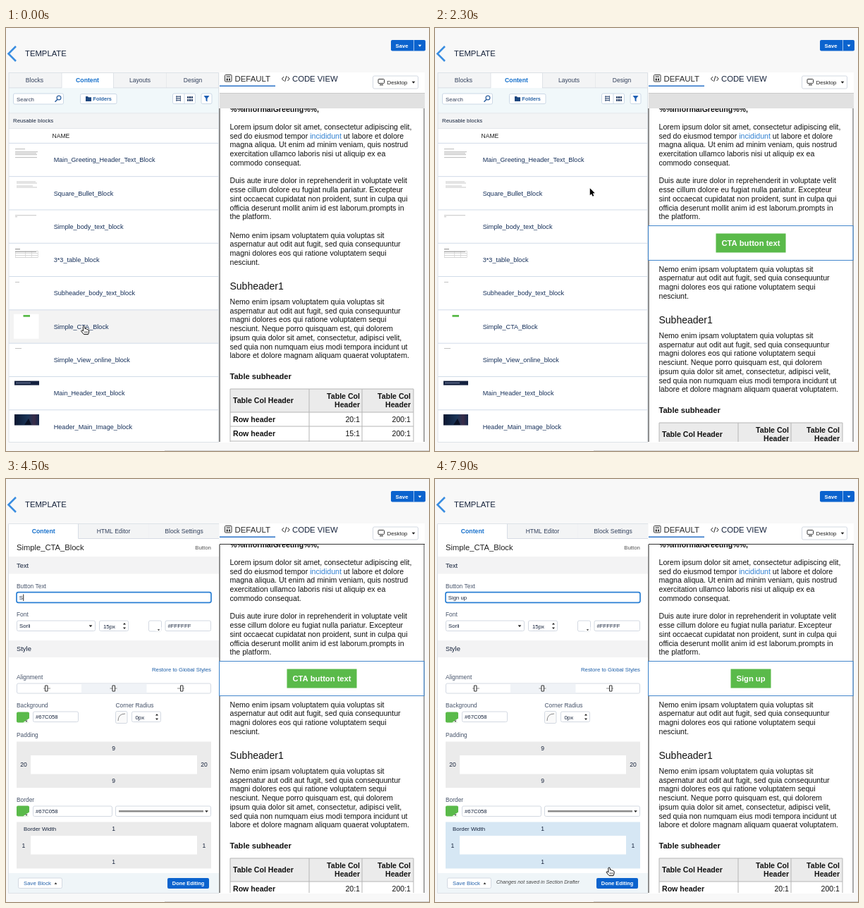
Write an HTML page with a canvas that moves like this. It is 600 px wide and 600 px high and loops after 8 s.

```html
<!DOCTYPE html>
<html lang="en">
<head>
<meta charset="utf-8">
<title>Template editor</title>
<style>
html, body { margin: 0; width: 100%; height: 100%; overflow: hidden; background: #f8f8f8; }
canvas { display: block; width: 100vw; height: 100vh; }
</style>
</head>
<body>
<canvas id="stage"></canvas>
<script>
const LOOP = 8000, STEP = 100, SIZE = 600;
const NAVY = '#16305a', BLUE = '#0b63ce', GREEN = '#5aba4a', EDGE = '#d3d9e2';
const canvas = document.getElementById('stage');
const c = canvas.getContext('2d');

// ---- drawing helpers ----
function text(s, x, mid, size, color = '#16233c', style = '', align = 'left') {
  c.font = `${style} ${size}px "Liberation Sans", sans-serif`;
  c.textAlign = align;
  c.fillStyle = color;
  c.fillText(s, x, mid + size * 0.36);
}
function rect(x, y, w, h, color) {
  c.fillStyle = color;
  c.fillRect(x, y, w, h);
}
function box(x, y, w, h, fill, edge, r = 2, lw = 1) {
  c.beginPath();
  c.roundRect(x, y, w, h, r);
  if (fill) { c.fillStyle = fill; c.fill(); }
  if (edge) { c.strokeStyle = edge; c.lineWidth = lw; c.stroke(); }
}
function line(points, color, lw = 1) {
  c.beginPath();
  for (let i = 0; i < points.length; i += 2) c.lineTo(points[i], points[i + 1]);
  c.strokeStyle = color;
  c.lineWidth = lw;
  c.stroke();
}
function poly(points, color) {
  c.beginPath();
  for (let i = 0; i < points.length; i += 2) c.lineTo(points[i], points[i + 1]);
  c.closePath();
  c.fillStyle = color;
  c.fill();
}
function down(x, y, color = '#222', r = 2.3) { poly([x - r, y - r / 2, x + r, y - r / 2, x, y + r / 2 + 0.5], color); }
function up(x, y, color = '#222', r = 2) { poly([x - r, y + r / 2, x + r, y + r / 2, x, y - r / 2 - 0.5], color); }
function clipped(x, y, w, h, draw) {
  c.save();
  c.beginPath();
  c.rect(x, y, w, h);
  c.clip();
  draw();
  c.restore();
}

// ---- timing helpers ----
function along(keys, t) {
  let i = 0;
  while (i < keys.length - 2 && t >= keys[i + 1][0]) i++;
  const [t0, x0, y0] = keys[i], [t1, x1, y1] = keys[i + 1];
  const k = Math.min(1, Math.max(0, (t - t0) / (t1 - t0)));
  return [x0 + (x1 - x0) * k, y0 + (y1 - y0) * k];
}
const TYPED = [[0, 'CTA button text'], [4500, 'S'], [5000, 'Si'], [5300, 'Sig'], [5600, 'Sign'],
  [6000, 'Sign '], [6500, 'Sign u'], [6900, 'Sign up']];
const typed = t => TYPED.filter(k => k[0] <= t).pop()[1];

const MOVES = [
  { from: 0, to: 1900, kind: 'hand', keys: [[100, 110.5, 423], [300, 128, 414], [500, 195, 372],
    [800, 310, 294], [1000, 338, 261], [1100, 338, 264], [1300, 334, 276]] },
  { from: 1900, to: 3200, kind: 'arrow', keys: [[1900, 334, 274], [2100, 295, 259], [2200, 253.5, 248.5],
    [2400, 186, 206], [2600, 127.5, 177.5], [3000, 82, 168], [3200, 66, 168]] },
  { from: 3200, to: 4500, kind: 'beam', keys: [[3200, 73, 168], [3500, 73, 168], [3900, 17, 168]] },
  { from: 7500, to: 8000, kind: 'auto', keys: [[7500, 214, 217], [7600, 222, 300], [7700, 232, 402],
    [7800, 242, 505], [7900, 247, 551]] }
];

// ---- page header and preview ----
function chrome() {
  rect(0, 0, SIZE, SIZE, '#f8f8f8');
  rect(225, 599, 375, 1, '#cfcfcf');
  line([14, 26, 3.5, 36.5, 14, 47], '#3a8de0', 2.6);
  text('TEMPLATE', 27, 35.5, 11.3, '#16233c');
  box(546, 17, 49, 15.5, BLUE, null, 2);
  rect(578, 17, 1, 15.5, '#9cc3f0');
  text('Save', 552.5, 25, 7.7, '#fff', 'bold');
  down(587, 25, '#fff');
  rect(303, 63, 291, 525, '#fff');
  box(310.5, 66.5, 9.5, 9.5, null, '#333', 1);
  rect(312.5, 68.5, 5.5, 1.2, '#333');
  rect(312.5, 71.5, 2.4, 3, '#333');
  rect(316, 71.5, 2, 3, '#333');
  text('DEFAULT', 324.5, 72, 11.4, '#2b2b2b');
  rect(303, 81.5, 79, 1.5, '#2a72c8');
  line([394, 69, 391.5, 72, 394, 75], '#222');
  line([398, 68, 395.5, 76], '#222');
  line([399.5, 69, 402, 72, 399.5, 75], '#222');
  text('CODE VIEW', 406, 72, 11.3, '#16233c');
  box(520.5, 68, 64, 18, '#fff', EDGE);
  box(528, 72.5, 8.5, 6, null, '#333', 1);
  rect(530, 80, 5, 1.2, '#333');
  text('Desktop', 540.5, 77, 7.9, '#222');
  down(578, 77);
}

const INTRO = ['Lorem ipsum dolor sit amet, consectetur adipiscing elit,', '',
  'magna aliqua. Ut enim ad minim veniam, quis nostrud',
  'exercitation ullamco laboris nisi ut aliquip ex ea', 'commodo consequat.', '',
  'Duis aute irure dolor in reprehenderit in voluptate velit',
  'esse cillum dolore eu fugiat nulla pariatur. Excepteur',
  'sint occaecat cupidatat non proident, sunt in culpa qui',
  'officia deserunt mollit anim id est laborum.prompts in', 'the platform.'];
const NEMO = ['Nemo enim ipsam voluptatem quia voluptas sit',
  'aspernatur aut odit aut fugit, sed quia consequuntur',
  'magni dolores eos qui ratione voluptatem sequi'];
const MORE = [...NEMO, 'nesciunt. Neque porro quisquam est, qui dolorem',
  'ipsum quia dolor sit amet, consectetur, adipisci velit,',
  'sed quia non numquam eius modi tempora incidunt ut',
  'labore et dolore magnam aliquam quaerat voluptatem.'];
const BODY = 10.6, LEAD = 12.75;

function lines(list, y) {
  list.forEach((s, i) => text(s, 317.5, y + i * LEAD, BODY, '#111'));
}
function linkLine(y) {
  let x = 317.5;
  for (const [s, color] of [['sed do eiusmod tempor ', '#111'], ['incididunt', '#2f7fd0'], [' ut labore et dolore', '#111']]) {
    text(s, x, y, BODY, color);
    x += c.measureText(s).width;
  }
}
function table(y) {
  rect(318, y, 260, 33, '#ebebeb');
  for (const d of [0, 33, 53, 74]) rect(318, y + d - 0.5, 260, 1, '#b5b5b5');
  for (const x of [317.5, 429.5, 504.5, 577.5]) rect(x, y, 1, 80, '#b5b5b5');
  text('Table Col Header', 322, y + 16.5, BODY, '#111', 'bold');
  for (const x of [502, 574]) {
    text('Table Col', x, y + 10, BODY, '#111', 'bold', 'right');
    text('Header', x, y + 22.5, BODY, '#111', 'bold', 'right');
  }
  ['20:1', '15:1'].forEach((v, i) => {
    const mid = y + 43 + i * 20.5;
    text('Row header', 322, mid, BODY, '#111', 'bold');
    text(v, 502, mid, BODY, '#111', '', 'right');
    text('200:1', 574, mid, BODY, '#111', '', 'right');
  });
}
function preview(t) {
  const dropped = t >= 1900, edited = t >= 2400;
  const top = edited ? 93 : 114, dy = edited ? -22 : 0, gap = dropped ? 48 : 0;
  clipped(302, top, 293, 587 - top, () => {
    rect(302.5, top, 1, 500, '#222');
    rect(592.5, top, 1, 500, '#555');
    c.save();
    c.translate(0, dy);
    text('%%InformalGreeting%%,', 318, 115, BODY, '#111', 'bold');
    lines(INTRO, 140);
    linkLine(140 + LEAD);
    c.translate(0, gap);
    lines([...NEMO, 'nesciunt.'], 293.7);
    text('Subheader1', 317.5, 366, 14, '#111');
    lines(MORE, 388);
    text('Table subheader', 317.5, 494, 11.1, '#111', 'bold');
    table(512);
    c.restore();
  });
  if (edited) rect(303, 92, 291, 1, '#333');
  else {
    rect(303, 92, 291, 22, '#e1e1e1');
    rect(303, 92, 291, 1, '#cacaca');
  }
  if (t >= 800 && !dropped) {
    box(303, 278, 290, 10, '#fff', null, 3);
    rect(303, 281, 290, 4.5, '#8fb3e2');
    rect(303, 281, 290, 1, '#7d9cc8');
  }
  if (dropped) {
    box(302.5, 280.5 + dy, 290.5, 49, '#fff', '#4487cc', 0, 1.2);
    const label = typed(t - STEP).trim();
    c.font = 'bold 11.2px "Liberation Sans", sans-serif';
    const w = c.measureText(label).width + 16;
    rect(448 - w / 2, 291.5 + dy, w, 27, GREEN);
    text(label, 448, 305 + dy, 11.2, '#fff', 'bold', 'center');
  }
  if (t >= 2000 && t < 2300) hoverCover();
}
function hoverCover() {
  rect(303, 93, 290, 187, 'rgba(0,0,0,.57)');
  c.beginPath();
  c.arc(580.5, 106, 8.5, 0, 7);
  c.strokeStyle = '#eee';
  c.lineWidth = 1.3;
  c.stroke();
  line([576, 104.5, 580.5, 109, 585, 104.5], '#eee', 1.5);
  line([398.5, 188.5, 405, 182], '#fff', 2.6);
  poly([396.5, 190.5, 397.5, 187, 400, 189.5], '#fff');
  text('Text ', 410, 186, 11.2, '#fff');
  text('(Click to edit)', 410 + c.measureText('Text ').width, 186, 11.2, '#fff', 'italic');
}

// ---- block list ----
const NAMES = ['Main_Greeting_Header_Text_Block', 'Square_Bullet_Block', 'Simple_body_text_block',
  '3*3_table_block', 'Subheader_body_text_block', 'Simple_CTA_Block', 'Simple_View_online_block',
  'Main_Header_text_block', 'Header_Main_Image_block'];
const ROW = 47.3;

function thumbs(hovered) {
  const y = i => 163.3 + i * ROW;
  const bars = (x, top, widths, color) => widths.forEach((w, i) => rect(x, top + i * 2, w, 0.8, color));
  bars(13, y(0) + 8, [14, 0, 32, 30, 31, 0, 31], '#aaa');
  bars(15, y(1) + 7, [27, 29, 0, 23, 29], '#bbb');
  bars(13, y(2) + 7.5, [30, 3], '#b5b5b5');
  rect(13, y(3) + 8, 7, 1, '#888');
  for (let i = 0; i < 4; i++) rect(13, y(3) + 11 + i * 3, 32, 0.6, '#bbb');
  for (const x of [13, 27, 36, 45]) rect(x, y(3) + 11, 0.6, 9.5, '#ccc');
  bars(13, y(3) + 12, [30], '#999');
  rect(13, y(4) + 7.5, 6, 0.9, '#bbb');
  if (hovered) rect(11, y(5) + 6, 35.5, 35, '#fff');
  rect(24.5, y(5) + 7.2, 9.5, 2.8, GREEN);
  rect(13, y(6) + 7, 9, 0.9, '#bbb');
  rect(12, y(7) + 6.2, 35, 6, '#14213f');
  rect(14, y(7) + 8.6, 21, 1, '#7d8bab');
  const g = c.createLinearGradient(12, 0, 47, 0);
  g.addColorStop(0, '#0b1730');
  g.addColorStop(0.55, '#1b3558');
  g.addColorStop(0.8, '#3a2c48');
  g.addColorStop(1, '#14274a');
  rect(12, y(8) + 6.3, 35, 15.5, g);
  poly([26, 563, 32, 554, 36, 563], '#0a1124');
}
function blockList(t) {
  rect(4, 63, 298, 525, '#fff');
  rect(4, 63, 298, 22, '#f3f4f5');
  rect(79, 63, 73.5, 23, '#fff');
  line([79, 85, 79, 63.5, 152.5, 63.5, 152.5, 85], '#e0e3e7');
  rect(227, 63, 1, 22, '#e8eaed');
  text('Blocks', 40.5, 74, 8.6, '#33415c', '', 'center');
  text('Content', 115.5, 74, 8.7, '#1670cc', 'bold', 'center');
  text('Layouts', 190, 74, 8.6, '#33415c', '', 'center');
  text('Design', 265, 74, 8.5, '#33415c', '', 'center');
  rect(4, 85, 298, 36, '#f1f8fa');
  rect(4, 84.5, 75, 0.8, EDGE);
  rect(152, 84.5, 150, 0.8, EDGE);
  box(10.5, 93, 71, 15, '#fff', '#cbd8e6');
  text('Search', 15, 101, 7.9, '#33415c');
  c.beginPath();
  c.arc(75, 99, 2.9, 0, 7);
  c.strokeStyle = '#2b5f9e';
  c.lineWidth = 1.2;
  c.stroke();
  line([73, 101.2, 69.5, 104.8], '#2b5f9e', 1.6);
  box(105.5, 93.5, 51.5, 14, '#fff', '#cbd8e6');
  poly([113, 97, 116, 97, 117, 98.2, 121, 98.2, 121, 104, 113, 104], '#1c477f');
  text('Folders', 123.5, 100.7, 7.3, '#2b66a8', 'bold');
  box(236.5, 93, 32, 14.5, '#fff', '#cbd8e6');
  rect(252.5, 93, 1, 14, '#cbd8e6');
  for (let i = 0; i < 3; i++) {
    rect(241, 96.5 + i * 2.7, 7, 1.4, '#53698a');
    rect(257.2 + i * 2.8, 97, 2, 2.8, NAVY);
    rect(257.2 + i * 2.8, 101, 2, 2.8, NAVY);
  }
  line([242, 96, 242, 104], '#53698a');
  line([247.5, 96, 247.5, 104], '#53698a');
  box(277, 93, 15, 14.5, '#fff', '#cbd8e6');
  poly([280.5, 96, 288.5, 96, 285.5, 100, 285.5, 104.5, 283.5, 103, 283.5, 100], '#1d5fb4');
  rect(4, 121, 298, 21.5, '#f3f4f5');
  rect(4, 120.5, 298, 0.8, '#e0e4e9');
  rect(4, 142, 298, 0.8, '#e0e4e9');
  text('Reusable blocks', 10, 131.5, 7.8, '#16233c');
  text('NAME', 65.5, 153, 8.6, '#222');
  const hovered = t < 1900;
  NAMES.forEach((name, i) => {
    const y = 163.3 + i * ROW;
    if (i === 5 && hovered) rect(4, y, 298, ROW, '#f3f3f3');
    rect(4, y - 0.4, 298, 0.9, '#ccd8e6');
    text(name, 67.7, y + 23.7, 9.12, NAVY);
  });
  if (t < 200 || t >= 1900) thumbs(hovered);
  line([4, 63.5, 301.5, 63.5, 301.5, 587.5, 4, 587.5, 4, 63], '#dbe0e6', 0.9);
}

// ---- block editor ----
function stepper(x, y) { up(x, y - 3); down(x, y + 3, '#222', 2); }
function swatch(x, y, color) {
  box(x, y, 18, 15, color, color === '#fff' ? EDGE : null, 2);
  poly([x + 18, y + 9, x + 18, y + 15, x + 9, y + 15], '#fff');
  down(x + 14, y + 13, '#333', 1.7);
}
function field(x, y, w, label, h = 14.5) {
  box(x + 0.5, y, w - 1, h, '#fff', EDGE);
  if (label) text(label, x + 4, y + h / 2 + 0.2, 7.8, '#16233c');
}
function insets(y, h, side, hover, middle) {
  rect(15, y, 276, h, hover ? '#d6e7f4' : '#ebebeb');
  rect(35, y + 19.5, 236, 26.5, '#fff');
  const num = (s, x, mid) => text(s, x, mid, 8.6, '#16233c', '', 'center');
  num(middle, 152.7, y + 9.2);
  num(middle, 152.7, y + h - 9.7);
  num(side, 25, y + h / 2);
  num(side, 281, y + h / 2);
}
function editor(t, tip) {
  const label = (s, x, y) => text(s, x, y, 8.4, '#46536a');
  const over = (y0, y1) => t >= 7500 && tip && tip[1] >= y0 && tip[1] < y1;
  rect(3, 63, 299, 525, '#fff');
  rect(103, 63, 199, 21.5, '#f3f4f5');
  line([302, 84.5, 102.5, 84.5, 102.5, 63.5], EDGE, 0.9);
  rect(202, 63, 1, 21, '#f0f1f3');
  text('Content', 53.2, 74, 8.7, '#1670cc', 'bold', 'center');
  text('HTML Editor', 152.5, 74, 8.5, '#33415c', '', 'center');
  text('Block Settings', 252.5, 74, 8.6, '#33415c', '', 'center');
  text('Simple_CTA_Block', 15, 97.3, 11.2, '#222');
  text('Button', 291, 97.5, 7.9, '#555', '', 'right');
  rect(3, 110, 299, 24.5, '#f3f3f4');
  text('Text', 15, 122.3, 9.4, '#16233c');
  label('Button Text', 15, 152);
  label('Font', 15, 191.8);
  field(15, 201, 112, 'Sorli');
  down(120, 208.5);
  field(132, 201, 42);
  text('15px', 138, 209, 7.8);
  stepper(168, 208.5);
  swatch(202.5, 201, '#fff');
  field(225.5, 201, 65.5, '#FFFFFF');
  rect(3, 229, 299, 24, '#f3f3f4');
  text('Style', 15, 241, 9.4, '#16233c');
  text('Restore to Global Styles', 291, 269.7, 7.8, '#1c5ea8', '', 'right');
  label('Alignment', 15, 281);
  box(15.5, 290, 275, 14, '#fff', EDGE);
  rect(107, 290.5, 92.5, 13, '#f0f3f7');
  [[58, 2], [152.5, 0], [248, -2]].forEach(([x, d]) => {
    line([x - 5, 297, x + 5, 297], '#777', 0.9);
    box(x - d / 2 - 1.5, 293, 3.5, 8, '#fff', '#333', 0);
  });
  label('Background', 15, 321);
  label('Corner Radius', 155.5, 321);
  swatch(15, 330.5, GREEN);
  field(38, 330, 65, '#67C058');
  box(155.5, 329.5, 16.5, 17, '#fafafa', EDGE);
  c.beginPath();
  c.moveTo(159, 343);
  c.quadraticCurveTo(159, 333, 169, 333);
  c.strokeStyle = '#888';
  c.lineWidth = 1;
  c.stroke();
  field(178, 330, 42);
  text('0px', 183.5, 338, 7.8);
  stepper(214, 337.5);
  label('Padding', 15, 363);
  insets(372.5, 65.5, '20', over(372, 438), '9');
  label('Border', 15, 455);
  swatch(15, 463.5, GREEN);
  field(38, 464, 113, '#67C058');
  field(155, 464, 136);
  rect(160, 470, 120, 2.5, '#8b8b8b');
  down(284.5, 471.3);
  insets(486.5, 66, '1', over(486, 553), '1');
  text('Border Width', 25, 496, 7.9);
  rect(3, 559, 299, 28.5, '#eff5f8');
  box(17.5, 566, 62, 14.5, '#fff', EDGE);
  text('Save Block', 25, 573.5, 7.8, '#2462ab');
  up(70.5, 573.7, '#222', 1.9);
  if (t >= 4600) text('Changes not saved in Section Drafter', 87, 571, 7.1, '#444', 'italic');
  box(229, 566, 59, 15, BLUE, null, 2);
  text('Done Editing', 258.5, 573.7, 7.35, '#fff', 'bold', 'center');
  buttonText(t);
  line([302, 63.5, 3.5, 63.5, 3.5, 587.5, 302, 587.5], '#dbe0e6', 0.9);
}
function buttonText(t) {
  const value = typed(t), focus = t >= 3400;
  if (focus) box(15, 160.7, 276, 14.6, '#fff', '#2a7fd4', 2.5, 1.7);
  else box(15.5, 161, 275, 14, '#fff', EDGE);
  c.font = '7.8px "Liberation Sans", sans-serif';
  const end = 18.7 + c.measureText(value).width;
  if (t >= 3600 && t < 4500) {
    const start = 18.7 + (end - 18.7) * Math.max(0, (3900 - t) / 400);
    rect(start, 163, end - start, 10, '#b4d5fb');
  }
  text(value, 18.7, 168.3, 7.8, '#16233c');
  if (t >= 4500 && t < 7300) rect(end + 0.4, 163.5, 0.9, 9.5, '#111');
  if (t >= 4600 && t < 7000) {
    c.save();
    c.shadowColor = 'rgba(0,0,0,.35)';
    c.shadowBlur = 5;
    c.shadowOffsetY = 1.5;
    rect(15, 177, 276, 28, '#fff');
    c.restore();
    text('Sign up', 24, 190, 8.4, '#111');
  }
}

// ---- pointers, drawn with the tip at 0,0 ----
const POINTERS = {
  arrow() {
    c.beginPath();
    [[0, 0], [0, 10], [2.3, 8], [3.9, 11.6], [5.6, 10.8], [4, 7.3], [7, 7.1]].forEach(p => c.lineTo(...p));
    c.closePath();
    c.strokeStyle = '#fff';
    c.lineWidth = 1.4;
    c.stroke();
    c.fillStyle = '#000';
    c.fill();
  },
  hand() {
    c.beginPath();
    c.moveTo(-1.2, 0.8);
    c.quadraticCurveTo(0, -1, 1.2, 0.8);
    c.lineTo(1.5, 3.6);
    c.quadraticCurveTo(3, 2.8, 3.7, 4.2);
    c.quadraticCurveTo(5, 3.6, 5.6, 5);
    c.quadraticCurveTo(7.4, 4.8, 7.2, 6.8);
    c.quadraticCurveTo(7.2, 9, 6, 11.6);
    c.lineTo(0, 11.6);
    c.quadraticCurveTo(-2.5, 9, -4, 6.6);
    c.quadraticCurveTo(-3.4, 4.7, -1, 6.8);
    c.closePath();
    c.fillStyle = '#fff';
    c.fill();
    c.strokeStyle = '#111';
    c.lineWidth = 1;
    c.stroke();
    for (const x of [1.2, 3, 4.8]) line([x, 7, x, 9.8], '#333', 0.7);
  },
  beam() {
    line([-1.7, -5, 0, -4.3, 1.7, -5], '#222', 0.9);
    line([0, -4.3, 0, 4.3], '#222', 0.9);
    line([-1.7, 5, 0, 4.3, 1.7, 5], '#222', 0.9);
  }
};

function draw(t) {
  const move = MOVES.find(m => t >= m.from && t < m.to);
  const tip = move && along(move.keys, t);
  chrome();
  preview(t);
  blockList(t);
  if (t >= 2400) {
    const slide = t >= 2800 ? 0 : -299 * Math.exp((2400 - t) / 65);
    clipped(2, 62, 300.5, 527, () => {
      c.translate(slide, 0);
      editor(t, tip);
    });
  }
  if (!move) return;
  const kind = move.kind !== 'auto' ? move.kind : tip[1] > 372 ? 'hand' : 'arrow';
  c.save();
  c.translate(...tip);
  POINTERS[kind]();
  c.restore();
}

const begin = performance.now();
function tick() {
  const t = Math.floor(((performance.now() - begin) % LOOP) / STEP) * STEP;
  const w = Math.round(innerWidth * devicePixelRatio), h = Math.round(innerHeight * devicePixelRatio);
  if (canvas.width !== w || canvas.height !== h) {
    canvas.width = w;
    canvas.height = h;
  }
  c.setTransform(w / SIZE, 0, 0, h / SIZE, 0, 0);
  draw(t);
  requestAnimationFrame(tick);
}
tick();
</script>
</body>
</html>
```
